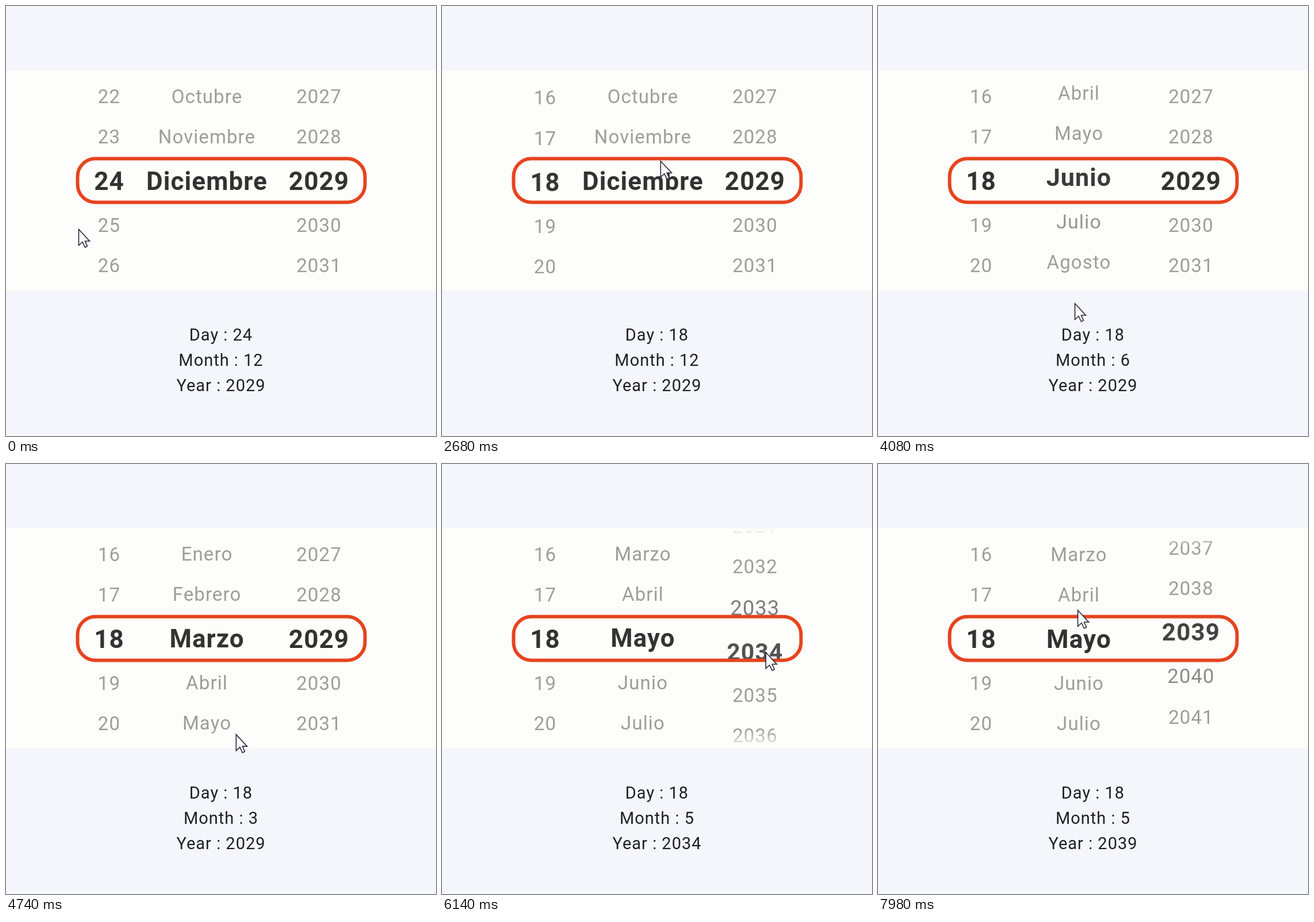
Animation, 748 px wide and 748 px high, one loop 8 s. Source, as an HTML page with a canvas:

```html
<!DOCTYPE html>
<html lang="es">
<head>
<meta charset="utf-8">
<title>Date picker</title>
<style>
  html, body { margin: 0; width: 100%; height: 100%; overflow: hidden; background: #f5f6fb; }
  canvas { display: block; }
</style>
</head>
<body>
<canvas id="stage" width="748" height="748"></canvas>
<script>
const ctx = document.getElementById('stage').getContext('2d');
const LOOP = 8000;
const BAND = { top: 112, bottom: 495, fade: 32 };
const CENTER_Y = 304;
const STEP = 77;
const CLICK_LAG = 125;
const MONTHS = ['Enero', 'Febrero', 'Marzo', 'Abril', 'Mayo', 'Junio', 'Julio',
  'Agosto', 'Septiembre', 'Octubre', 'Noviembre', 'Diciembre'];
const FIRST = { day: 24, month: 12, year: 2029 };

// Each drag pulls its wheel along with the pointer; on release the wheel settles on a value.
const drag = (wheel, start, end, from, to, settle) => ({ wheel, start, end, from, to, settle });
const DRAGS = [
  drag('day', 1200, 1620, [200, 292], [201, 486], 18),
  drag('month', 2700, 3100, [380, 269], [360, 440], 9),
  drag('month', 3680, 4080, [365, 292], [342, 517], 3),
  drag('month', 4760, 5120, [400, 470], [410, 408], 5),
  drag('year', 5380, 5750, [549, 408], [560, 200], 2034),
  drag('year', 6480, 6840, [565, 430], [582, 186], 2041),
  drag('year', 7350, 7700, [575, 200], [520, 292], 2039),
];

const clamp = u => Math.min(1, Math.max(0, u));
const smooth = u => u * u * (3 - 2 * u);
const mix = (a, b, u) => a.map((v, i) => v + (b[i] - v) * u);
const spring = ms => Math.exp(-0.004 * ms) * Math.cos(0.0023 * ms);

function wheelPosition(wheel, t) {
  const drags = DRAGS.filter(d => d.wheel === wheel && d.start <= t);
  return drags.reduce((value, d, i) => {
    const now = i + 1 < drags.length ? drags[i + 1].start : t;
    const pulled = clamp((now - d.start) / (d.end - d.start));
    const held = value - pulled * (d.to[1] - d.from[1]) / STEP;
    return now < d.end ? held : d.settle + (held - d.settle) * spring(now - d.end);
  }, FIRST[wheel]);
}

function pointer(t) {
  let leftAt = 0, place = [126, 388];
  for (const d of [...DRAGS, { start: 7985, end: LOOP, from: [347, 254], to: [347, 254] }]) {
    if (t < d.start) return mix(place, d.from, smooth(clamp((t - leftAt) / (d.start - leftAt))));
    if (t < d.end) return mix(d.from, d.to, (t - d.start) / (d.end - d.start));
    leftAt = d.end;
    place = d.to;
  }
  return place;
}

function text(str, x, baseline, size, weight, color, spacing) {
  ctx.font = `${weight} ${size}px Roboto, sans-serif`;
  ctx.letterSpacing = spacing + 'px';
  ctx.fillStyle = color;
  ctx.fillText(str, x, baseline);
}

function drawWheel(x, position, label) {
  const nearest = Math.round(position);
  for (let value = nearest - 3; value <= nearest + 3; value++) {
    const d = value - position, dist = Math.abs(d);
    const focus = Math.max(0, 1 - dist);
    const y = CENTER_Y + Math.sign(d) * (STEP * Math.min(dist, 1) + 70 * Math.max(dist - 1, 0));
    const size = 33 + 11 * focus;
    const gray = Math.round(157 - 107 * focus);
    text(label(value), x, y + size * 0.355, size, dist < 0.5 ? 700 : 400,
      `rgb(${gray},${gray},${gray})`, 1.1);
  }
}

function fadeEdge(edge, direction) {
  const inner = edge + direction * BAND.fade;
  const gradient = ctx.createLinearGradient(0, edge, 0, inner);
  gradient.addColorStop(0, 'rgba(253,253,251,1)');
  gradient.addColorStop(1, 'rgba(253,253,251,0)');
  ctx.fillStyle = gradient;
  ctx.fillRect(0, Math.min(edge, inner), 748, BAND.fade);
}

function drawPointer(t) {
  if (DRAGS.some(d => t >= d.start && t < d.end)) {
    const [x, y] = pointer(t - CLICK_LAG);
    ctx.fillStyle = 'rgba(250,246,170,0.55)';
    ctx.beginPath();
    ctx.arc(x + 4, y, 26, 0, 2 * Math.PI);
    ctx.fill();
  }
  ctx.save();
  ctx.translate(...pointer(t));
  const arrow = new Path2D('M0.5 0.5V28.5L7 22.5L11.5 32L15.5 30L11.5 21H19.5Z');
  ctx.fillStyle = '#fff';
  ctx.fill(arrow);
  ctx.strokeStyle = '#26263c';
  ctx.lineWidth = 1.6;
  ctx.stroke(arrow);
  ctx.restore();
}

function draw(t) {
  const [day, month, year] = Object.keys(FIRST).map(wheel => wheelPosition(wheel, t));
  ctx.fillStyle = '#f5f6fb';
  ctx.fillRect(0, 0, 748, 748);
  ctx.textAlign = 'center';

  ctx.save();
  ctx.beginPath();
  ctx.rect(0, BAND.top, 748, BAND.bottom - BAND.top);
  ctx.clip();
  ctx.fillStyle = '#fdfdfb';
  ctx.fillRect(0, 0, 748, 748);
  drawWheel(179.5, day, String);
  drawWheel(349.5, month, value => MONTHS[value - 1] || '');
  drawWheel(544.5, year, String);
  fadeEdge(BAND.top, 1);
  fadeEdge(BAND.bottom, -1);
  ctx.restore();

  ctx.strokeStyle = '#e6441f';
  ctx.lineWidth = 6;
  ctx.beginPath();
  ctx.roundRect(124.5, 265.5, 500, 76, 31);
  ctx.stroke();

  [`Day : ${Math.round(day)}`, `Month : ${Math.round(month)}`, `Year : ${Math.round(year)}`]
    .forEach((line, i) => text(line, 374, 582 + 44 * i, 29, 400, '#202024', 1));
  drawPointer(t);
}

const start = performance.now();
function tick() {
  draw((performance.now() - start) % LOOP);
  requestAnimationFrame(tick);
}
tick();
</script>
</body>
</html>
```
